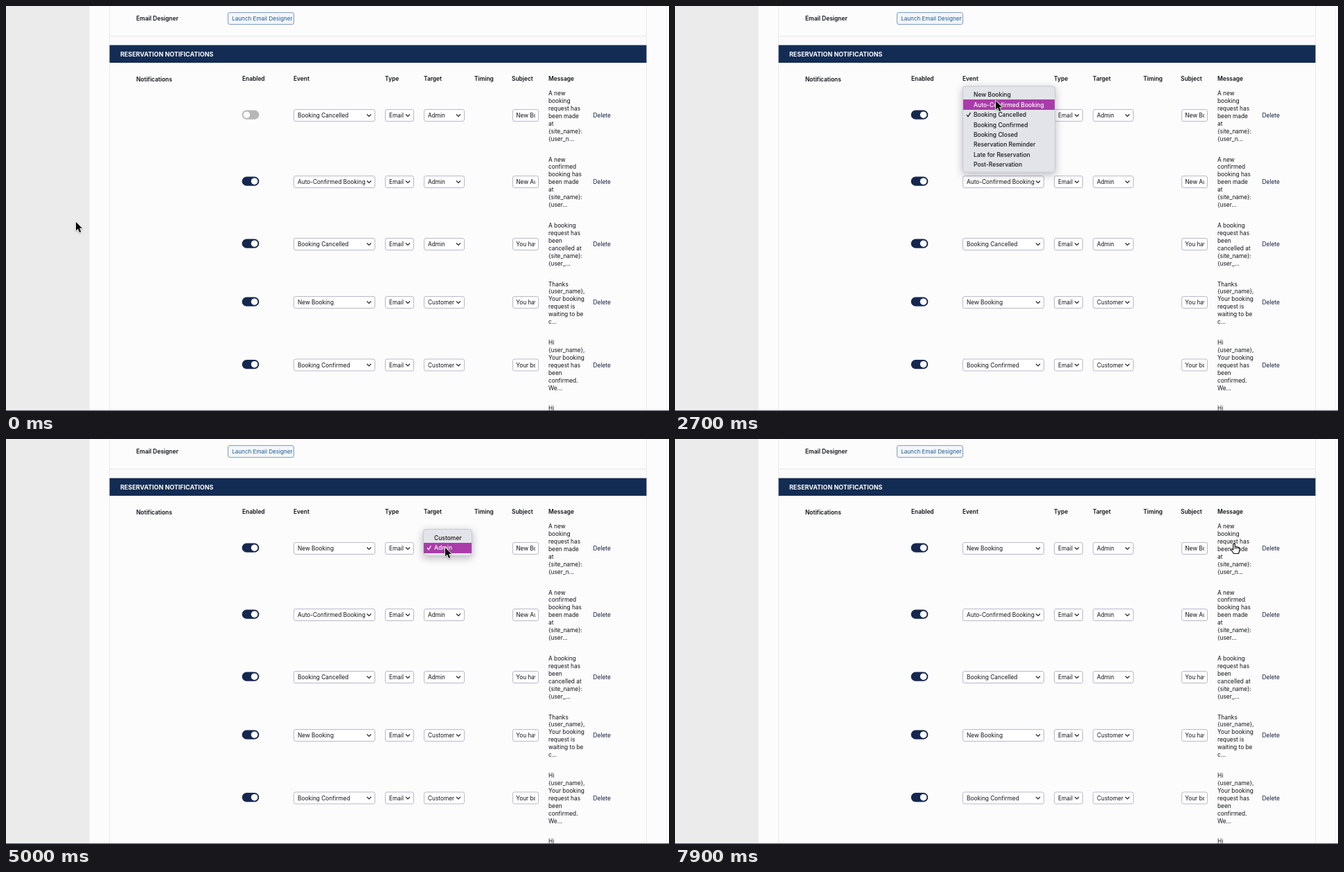
Recreate the animation shown at these times as an HTML page with a canvas. Size 957 px wide and 585 px high, loop 8000 ms.

```html
<!DOCTYPE html>
<html lang="en">
<head>
<meta charset="utf-8">
<title>Reservation notifications</title>
<style>
html, body { margin: 0; width: 100%; height: 100%; overflow: hidden; background: #fcfcfc; }
canvas { display: block; }
</style>
</head>
<body>
<canvas id="stage" width="957" height="585"></canvas>
<script>
const ctx = document.getElementById('stage').getContext('2d');
const INK = '#0f1118', NAVY = '#122c54', BLUE = '#0f4a75', LINE = '#b9b9cd';
const LOOP = 8000, STEP = 100;

const EVENTS = ['New Booking', 'Auto-Confirmed Booking', 'Booking Cancelled', 'Booking Confirmed',
  'Booking Closed', 'Reservation Reminder', 'Late for Reservation', 'Post-Reservation'];

const ROWS = [
  { y: 158, top: 126, event: 2, target: 'Admin', subject: 'New Booking Request',
    message: 'A new|booking|request has|been made|at|{site_name}:|{user_n...' },
  { y: 254, top: 221.5, event: 1, target: 'Admin', subject: 'New Auto-Confirmed',
    message: 'A new|confirmed|booking has|been made|at|{site_name}:|{user...' },
  { y: 344, top: 317, event: 2, target: 'Admin', subject: 'You have a cancellation',
    message: 'A booking|request has|been|cancelled at|{site_name}:|{user_...' },
  { y: 428, top: 401.5, event: 0, target: 'Customer', subject: 'You have a request',
    message: 'Thanks|{user_name},|Your booking|request is|waiting to be|c...' },
  { y: 518.5, top: 486, event: 3, target: 'Customer', subject: 'Your booking',
    message: 'Hi|{user_name},|Your booking|request has|been|confirmed.|We...' }
];

// time, x, y of the pointer tip
const PATH = [
  [0, 101, 312], [800, 101, 312], [1200, 352, 158], [1350, 354, 157], [1500, 410, 154],
  [1900, 468, 157], [2300, 468, 157], [2700, 463, 137], [3000, 465, 128], [3300, 467, 128],
  [3700, 523, 166], [4300, 632, 158], [5000, 634, 157], [5800, 634, 157],
  [6400, 750, 160], [7000, 752, 160], [7400, 803, 153], [7900, 807, 151], [8000, 807, 151]
];

function text(s, x, y, color = INK, size = 8.3, weight = 400) {
  ctx.font = `${weight} ${size}px Inter, "Open Sans", sans-serif`;
  ctx.fillStyle = color;
  ctx.fillText(s, x, y + 3);
}

function rect(x, y, w, h, color) {
  ctx.fillStyle = color;
  ctx.fillRect(x, y, w, h);
}

function box(x, y, w, h, r, fill, stroke) {
  ctx.beginPath();
  ctx.roundRect(x, y, w, h, r);
  ctx.fillStyle = fill;
  ctx.fill();
  if (!stroke) return;
  ctx.strokeStyle = stroke;
  ctx.lineWidth = 1;
  ctx.stroke();
}

function line(points, color, width) {
  ctx.beginPath();
  points.forEach(([x, y]) => ctx.lineTo(x, y));
  ctx.strokeStyle = color;
  ctx.lineWidth = width;
  ctx.stroke();
}

function toggle(y, on) {
  box(340.7, y - 6.6, 24.6, 13.2, 6.6, on ? '#16274f' : '#b7b7b9');
  ctx.beginPath();
  ctx.arc(on ? 358.6 : 347.4, y, 4.8, 0, 7);
  ctx.fillStyle = '#fff';
  ctx.fill();
}

function select(x, y, w, label, focused) {
  box(x + .5, y - 8.5, w, 17, 2.5, '#fff', LINE);
  text(label, x + 6, y, focused ? BLUE : INK);
  const cx = x + w - 8;
  line([[cx - 3, y - 1.5], [cx, y + 1.5], [cx + 3, y - 1.5]], '#24262e', 1.2);
}

function subject(y, label) {
  box(731.5, y - 8.5, 37, 17, 2.5, '#fff', LINE);
  ctx.save();
  ctx.beginPath();
  ctx.rect(732, y - 8, 32, 16);
  ctx.clip();
  text(label, 736.2, y);
  ctx.restore();
}

function menu(x, y, w, h, items, checked, active) {
  ctx.save();
  ctx.shadowColor = 'rgba(40,40,60,.32)';
  ctx.shadowBlur = 12;
  ctx.shadowOffsetY = 3;
  box(x, y, w, h, 4, '#e3e4e9');
  ctx.restore();
  box(x + .5, y + .5, w - 1, h - 1, 4, '#e3e4e9', '#c9cad1');
  items.forEach((item, i) => {
    const cy = y + 12.8 + i * 14.4;
    const color = i === active ? '#fff' : '#14151b';
    if (i === active) rect(x + 1, Math.round(cy - 7.5), w - 2, 15, '#aa3ca9');
    if (i === checked) line([[x + 6, cy], [x + 8, cy + 2.7], [x + 11.5, cy - 3]], color, 1.2);
    text(item, x + 16, cy, color, 8.5, 500);
  });
}

function page(t) {
  rect(0, 0, 957, 585, '#fcfcfc');
  rect(0, 0, 120.5, 585, '#ebebec');
  rect(953, 0, 1, 585, '#f1f1f3');
  rect(149, 0, 1, 585, '#e9e9ed');
  rect(924, 0, 1, 585, '#e9e9ed');
  rect(149, 43, 776, 1, '#e9e9ed');
  rect(150, 44, 774, 12, '#fafafa');

  text('Email Designer', 188, 18, INK, 8.45, 600);
  box(320.5, 9.5, 95, 17, 2.5, '#f4f6fa', '#7d9dc6');
  text('Launch Email Designer', 326.2, 18, '#1c5a93', 8.1);

  rect(149.5, 56.5, 775, 25.5, NAVY);
  text('RESERVATION NOTIFICATIONS', 165, 69.5, '#fff', 8.95, 700);
  text('Notifications', 188, 106, INK, 8.4, 600);
  const heads = { Enabled: 341, Event: 415, Type: 547, Target: 603, Timing: 676, Subject: 730, Message: 783 };
  for (const name in heads) text(name, heads[name], 104.5, INK, 8.4, 600);

  ROWS.forEach((row, i) => {
    const first = i === 0;
    toggle(row.y - .8, !first || t >= 1300);
    select(415, row.y, 117, EVENTS[first && t >= 3200 ? 0 : row.event], first && t >= 3200 && t < 4300);
    select(547, row.y, 41, 'Email');
    select(603, row.y, 58, row.target, first && t >= 5700 && t < 7100);
    subject(row.y, row.subject);
    row.message.split('|').forEach((s, n) => text(s, 783, row.top + n * 10.95));
    text('Delete', 847.5, row.y, '#0e1740', 8.4);
  });
  text('Hi', 783, 581);
  rect(0, 584, 957, 1, '#55566a');
}

const ARROW = new Path2D('M0 0V12.4L2.9 9.8L5.1 15L7.3 14L5.1 9H9Z');
const HAND = new Path2D('M-1.3 1Q0-.7 1.3 1V5Q2.7 4 3.7 5.2Q5 4.5 6 5.8Q7.6 5.3 8 7V10L6.5 14.5H-.5L-4 9.5Q-4.4 7.5-2.7 7.9L-1.3 9Z');

function cursor(x, y, kind) {
  ctx.save();
  ctx.translate(x, y);
  ctx.lineJoin = 'round';
  if (kind === 'beam') {
    const bars = [[[-3, -7], [0, -5.8], [3, -7]], [[0, -6], [0, 6]], [[-3, 7], [0, 5.8], [3, 7]], [[-1.5, 1.5], [1.5, 1.5]]];
    bars.forEach(b => line(b, '#fff', 2.4));
    bars.forEach(b => line(b, '#111', 1.2));
  } else if (kind === 'hand') {
    ctx.fillStyle = '#fff';
    ctx.fill(HAND);
    ctx.strokeStyle = '#111';
    ctx.lineWidth = 1.2;
    ctx.stroke(HAND);
    [1.3, 3.7, 6].forEach(k => line([[k, 5.5], [k, 8]], '#111', .9));
  } else {
    ctx.shadowColor = 'rgba(0,0,0,.3)';
    ctx.shadowBlur = 2;
    ctx.shadowOffsetY = 1;
    ctx.strokeStyle = '#fff';
    ctx.lineWidth = 1.6;
    ctx.stroke(ARROW);
    ctx.shadowColor = 'transparent';
    ctx.fillStyle = '#000';
    ctx.fill(ARROW);
  }
  ctx.restore();
}

function pointer(t) {
  const i = PATH.findIndex(p => p[0] > t);
  const [t0, x0, y0] = PATH[i - 1], [t1, x1, y1] = PATH[i];
  const k = (t - t0) / (t1 - t0), e = k * k * (3 - 2 * k);
  return [x0 + (x1 - x0) * e, y0 + (y1 - y0) * e];
}

function cursorKind(x, y, menuOpen) {
  if (menuOpen || y < 149 || y > 167) return 'arrow';
  if (x >= 731 && x <= 769) return 'beam';
  const over = (a, b) => x >= a && x <= b;
  return over(341, 365) || over(415, 533) || over(547, 589) || over(603, 662) || over(783, 833) ? 'hand' : 'arrow';
}

function draw(t) {
  const [x, y] = pointer(t);
  const eventMenu = t >= 2100 && t < 3200, targetMenu = t >= 4400 && t < 5700;
  page(t);
  if (eventMenu) menu(415, 115.5, 134, 125, EVENTS, 2, Math.max(0, Math.floor((y - 121) / 14.4)));
  if (targetMenu) menu(602, 130, 71, 39, ['Customer', 'Admin'], 1, 1);
  cursor(x, y, cursorKind(x, y, eventMenu || targetMenu));
}

function frame() {
  draw(Math.floor(performance.now() % LOOP / STEP) * STEP);
  requestAnimationFrame(frame);
}
frame();
</script>
</body>
</html>
```
